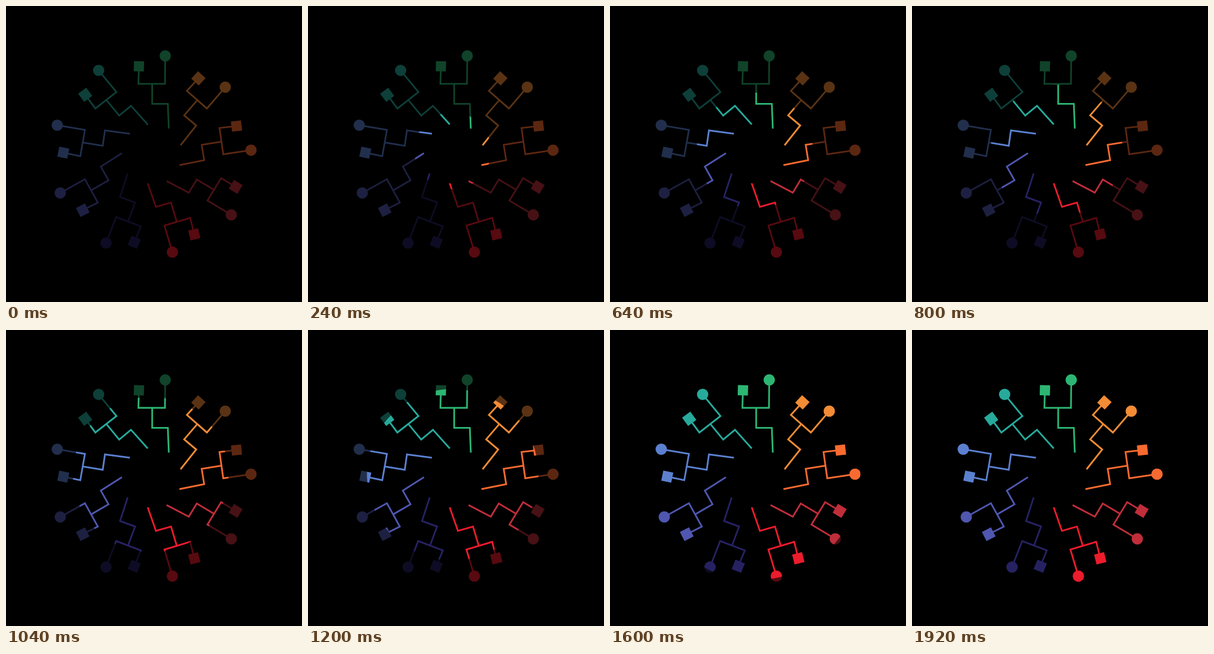
An HTML page for the animation above (2000 ms loop, 540 by 540 pixels).

```html
<!DOCTYPE html>
<html lang="en">
<head>
<meta charset="utf-8">
<title>Circuit burst</title>
<style>
  html, body { margin: 0; width: 100%; height: 100%; overflow: hidden; background: #000; }
  svg { display: block; width: 100vw; height: 100vh; }
  polyline { fill: none; stroke: currentColor; stroke-width: 3; stroke-linejoin: miter; }
  circle, rect { fill: currentColor; }
</style>
</head>
<body>
<svg viewBox="0 0 540 540">
  <clipPath id="reveal"><circle id="front" cx="264" cy="264" r="48.5"/></clipPath>
  <g id="dim" opacity="0.37"></g>
  <g id="lit" clip-path="url(#reveal)"></g>
</svg>
<script>
  // colour | inner end, two bends | square, left corner, right corner, disc
  const ARMS = [
    "#2db673|297,223.5 295.2,178.5 266.7,178.5|242.5,110 241.5,142 290,142 290.5,91",
    "#f48c36|318.5,254 347,218 325,199.5|351,132 330,155 366.5,187 400,148",
    "#f96a30|316.5,290.3 361.5,281.3 357,253.3|420.5,219 389.5,222.5 396.3,270.5 447,263",
    "#c02e3a|293,319.3 333.5,340.5 348,316.5|419,330 392.5,314 367.5,355 411,381",
    "#eb1c2c|258.5,323.5 273.5,366.5 301,358.5|343.5,416.5 336,386.5 289,400.5 303.5,449",
    "#262262|222,305.5 208,348.5 235.5,358.5|234,431 246,402 201,385 182.5,432.5",
    "#4f57b0|211.5,268.5 173,293 187,318|140,372.5 167.5,358.5 144,316 99,341",
    "#5b80cf|226,233 180.5,227 176.5,255|104.5,267.5 135.5,274 144,226 93.5,217.5",
    "#27aa9c|258.5,216 228,182 206.5,200|144.5,162 163,187 201.5,157 169,117.5"
  ];
  const LOOP = 2000, STEP = 80, START_RADIUS = 48.5, SPEED = 0.09;
  const SIDE = 18.5, DISC = 10.3;

  function armMarkup(row) {
    const [color, stem, fork] = row.split("|");
    const [square, left, right, disc] = fork.split(" ").map(p => p.split(",").map(Number));
    const joint = left.map((v, i) => v + (right[i] - v) * 0.52);
    const angle = Math.atan2(square[1] - left[1], square[0] - left[0]) * 180 / Math.PI;
    return `<g color="${color}">
      <polyline points="${stem} ${joint}"/>
      <polyline points="${fork}"/>
      <rect x="${-SIDE / 2}" y="${-SIDE / 2}" width="${SIDE}" height="${SIDE}"
        transform="translate(${square}) rotate(${angle})"/>
      <circle cx="${disc[0]}" cy="${disc[1]}" r="${DISC}"/>
    </g>`;
  }

  const art = ARMS.map(armMarkup).join("");
  document.getElementById("dim").innerHTML = art;
  document.getElementById("lit").innerHTML = art;

  const front = document.getElementById("front");
  const origin = performance.now();

  function draw() {
    const t = (performance.now() - origin) % LOOP;
    const held = Math.floor(t / STEP) * STEP;
    front.setAttribute("r", START_RADIUS + SPEED * held);
    requestAnimationFrame(draw);
  }
  draw();
</script>
</body>
</html>
```
